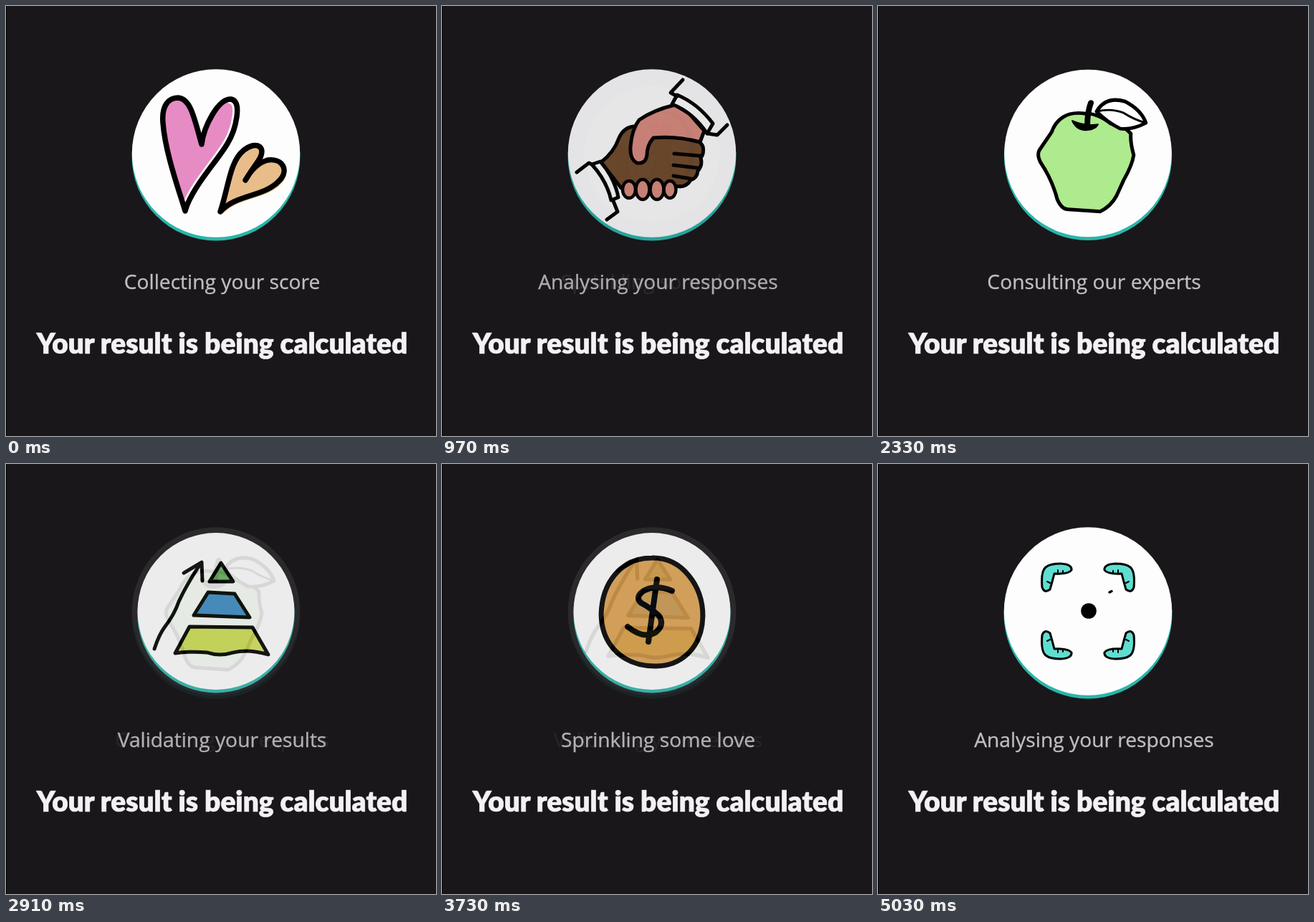
Write an HTML page that moves like this. It is 600 px wide and 600 px high and loops after 5.06 s.

```html
<!DOCTYPE html>
<html lang="en">
<head>
<meta charset="utf-8">
<title>Calculating</title>
<style>
html, body { margin: 0; height: 100%; overflow: hidden; background: #19171a; }
svg { display: block; width: 600px; height: 600px; }
text { text-anchor: middle; }
.status { font: 28.2px "Open Sans", sans-serif; fill: #bfbec0; stroke: #bfbec0; stroke-width: .35px; }
.title { font: 900 38.8px Lato, sans-serif; fill: #f4f1f6; stroke: #f4f1f6; stroke-width: .7px; }
.ink { stroke: #000; fill: none; stroke-linecap: round; stroke-linejoin: round; }
</style>
</head>
<body>
<svg viewBox="0 0 600 600">
  <defs>
    <path id="bigHeart" d="M250 286C243 262 222 205 219 163C217 140 226 128 240 128C258 129 263 158 273 193C276 168 296 129 314 130C330 133 321 172 309 192C295 216 258 255 250 286Z"/>
    <path id="smallHeart" d="M299 287C311 251 312 217 332 201C350 187 365 197 352 216Q342 230 334 243Q347 220 365 215C386 212 395 229 382 243C361 267 321 262 299 287Z"/>
    <g id="pawn" fill="#dc9c52" stroke-width="1.8">
      <path d="M-10-63C-10-45-14-38-18-30H18C14-38 10-45 10-63Z"/>
      <circle cy="-83" r="16"/>
      <path d="M-12-74Q-14-68-19-63Q0-57 19-63Q14-68 12-74Q0-69-12-74Z" stroke="none"/>
      <path d="M-12-74Q-14-68-19-63Q0-57 19-63Q14-68 12-74"/>
      <path d="M-18-31Q-21-22-28-17Q-33-3-22-1Q0 2 22-1Q33-3 28-17Q21-22 18-31Q0-27-18-31Z"/>
      <path d="M-28-16Q-8-9 10-11M20-13L28-16" fill="none"/>
    </g>
    <g id="corner">
      <path d="M229 172Q227 150 234 144Q240 139 255 139Q271 140 270 148Q266 154 246 153Q243 165 240 175Q232 181 229 172Z" fill="#5fded0" stroke-width="3"/>
      <path d="M251 152V148M258 152V149M240 166L236 164" stroke-width="2"/>
    </g>
  </defs>

  <rect width="600" height="600" fill="#19171a"/>
  <rect width="1" height="600"/>

  <g class="scene" data-text="Collecting your score">
    <g class="ink" stroke-width="7.5">
      <use href="#bigHeart" fill="#e78bc5" stroke="none"/>
      <path d="M314 130C330 133 321 172 309 192C295 216 258 255 250 286" stroke="#fff" stroke-width="13"/>
      <use href="#bigHeart"/>
      <use href="#smallHeart" fill="#e8bd8a" stroke="none" transform="translate(3 4)"/>
      <use href="#smallHeart" fill="#e8bd8a"/>
    </g>
  </g>

  <g class="scene" data-text="Analysing your responses">
    <g class="ink" stroke-width="5">
      <path d="M222 218Q240 204 247 184Q254 168 270 168L330 181Q358 183 364 196Q366 206 361 212Q364 222 357 230Q356 240 347 243Q339 256 322 250L250 254Z" fill="#704a2c"/>
      <g fill="#da8a7f" stroke-width="4.5">
        <ellipse cx="261" cy="256" rx="9" ry="12"/>
        <ellipse cx="280" cy="256" rx="9.5" ry="14"/>
        <ellipse cx="300" cy="256" rx="9.5" ry="14"/>
        <ellipse cx="318" cy="256" rx="8.5" ry="12"/>
      </g>
      <path d="M325 138Q295 145 275 159Q265 172 263 196Q262 214 272 219Q284 221 286 208Q286 194 295 184Q328 181 360 190L366 174L345 150Z" fill="#da8a7f"/>
      <path d="M324 206L360 209M323 222L357 226M323 237L347 241"/>
      <path d="M328 124Q357 136 378 164L370 178Q350 148 321 137Z" fill="#fff"/>
      <path d="M336 103L319 121L328 126M371 178L384 180L398 166"/>
      <path d="M209 221L221 217Q241 240 246 267L236 271Q230 244 209 221Z" fill="#fff"/>
      <path d="M188 232L205 219L211 222M239 272L245 287L230 298"/>
    </g>
  </g>

  <g class="scene" data-text="Sprinkling some love">
    <g class="ink" stroke-width="1.8">
      <ellipse cx="317" cy="202" rx="50" ry="69" fill="#000"/>
      <ellipse cx="308.5" cy="202" rx="50" ry="68" fill="#fff"/>
      <use href="#pawn" x="310.5" y="269"/>
      <use href="#pawn" transform="translate(241 269) scale(.76)"/>
      <path d="M294 172L291 154L300 162L301 151L309 161L315 149L317 161L326 153L324 170Q309 166 294 172Z" fill="#d9e244"/>
      <path d="M335 232L350 218M341 234L351 224" stroke="#777" stroke-width="1.3"/>
    </g>
  </g>

  <g class="scene" data-text="Consulting our experts">
    <g class="ink" stroke-width="5">
      <path d="M290 150Q270 147 258 155Q247 162 242 176L225 201Q221 208 227 219Q243 243 250 270Q256 284 265 284L310 287Q325 280 333 265L343 243Q355 222 357 208Q352 190 353 178Q345 168 325 164Q305 149 290 150Z" fill="#aeea8e"/>
      <path d="M305 147Q318 125 345 133Q368 145 374 163Q355 173 338 171Q320 162 305 147Z" fill="#fff"/>
      <path d="M305 147Q325 142 343 149Q357 158 374 163" stroke-width="3"/>
      <path d="M271 160Q277 174 292 173Q304 172 307 165Q290 168 271 160Z" fill="#000" stroke-width="2"/>
      <path d="M292 168Q292 148 297 135" stroke-width="8"/>
    </g>
  </g>

  <g class="scene" data-text="Validating your results">
    <g class="ink" stroke-width="5" transform="translate(293 205.5) scale(1.07) translate(-293 -205.5)">
      <path d="M207 258Q213 239 221 228Q235 210 241 192Q252 168 272 138M248 152L273 137L274 163"/>
      <path d="M300 138L284 164H317Z" fill="#6fb063"/>
      <path d="M282 179L319 181L340 214L262 211Z" fill="#3f8ccb"/>
      <path d="M256 227L344 228L366 266Q338 258 318 263Q298 269 280 263Q258 261 236 264Z" fill="#d3df5c"/>
    </g>
  </g>

  <g class="scene" data-text="Sprinkling some love">
    <g class="ink" stroke-width="7" transform="translate(293 205.5) scale(1.07) translate(-293 -205.5)">
      <path d="M293 131C335 130 364 170 364 212C363 260 330 283 297 282C255 282 223 255 222 210C223 165 250 131 293 131Z" fill="#dda251"/>
      <path d="M321 177Q300 168 283 176Q268 185 278 194Q290 200 303 212Q311 225 298 235Q281 245 259 227M300 161L288 248" stroke-width="8"/>
    </g>
  </g>

  <g class="scene" data-text="Analysing your responses">
    <g class="ink">
      <use href="#corner"/>
      <use href="#corner" transform="matrix(-1 0 0 1 586 0)"/>
      <use href="#corner" transform="matrix(1 0 0 -1 0 411)"/>
      <use href="#corner" transform="matrix(-1 0 0 -1 586 411)"/>
      <circle cx="294" cy="205" r="10.8" fill="#000" stroke="none"/>
      <path d="M323 179L326 177.5" stroke-width="3.5"/>
    </g>
  </g>

  <text class="title" x="301.5" y="484.5">Your result is being calculated</text>
</svg>
<script>
const LOOP = 5060, FIRST = 110, STEP = 820, FADE = 370, GROW = 620;
const CX = 293, CY = 205.5;
const svg = document.querySelector("svg");
const clamp = v => Math.max(0, Math.min(1, v));

function add(parent, tag, attrs, before = null) {
  const el = document.createElementNS(svg.namespaceURI, tag);
  for (const name in attrs) el.setAttribute(name, attrs[name]);
  return parent.insertBefore(el, before);
}

const scenes = [...document.querySelectorAll(".scene")].map(badge => {
  const icon = badge.firstElementChild;
  add(badge, "circle", { cx: CX, cy: CY + 4.5, r: 117.5, fill: "#2ab5aa" }, icon);
  add(badge, "circle", { cx: CX, cy: CY, r: 117.2, fill: "#fefdfe" }, icon);
  const label = add(svg, "text", { class: "status", x: 301.5, y: 395 });
  label.textContent = badge.dataset.text;
  return { badge, label };
});
// Outgoing badges lie above the incoming ones.
scenes.forEach(({ badge }) => svg.prepend(badge));
svg.prepend(...svg.querySelectorAll(":scope > rect"));

function draw(now) {
  const t = now % LOOP;
  scenes.forEach(({ badge, label }, i) => {
    const start = FIRST + (i - 1) * STEP;
    const last = i === scenes.length - 1;
    const fadeIn = i ? clamp((t - start) / FADE) : 1;
    const fadeOut = last ? 0 : clamp((t - start - STEP) / FADE);
    const left = i ? 1 - clamp((t - start) / GROW) : 0;
    const scale = 1 - 0.22 * left ** 1.5;
    const alpha = fadeIn * (1 - fadeOut);
    badge.setAttribute("opacity", alpha);
    label.setAttribute("opacity", alpha);
    badge.setAttribute("transform",
      `translate(${CX} ${CY}) scale(${scale}) translate(${-CX} ${-CY})`);
  });
}

const begin = performance.now();
function tick() {
  draw(performance.now() - begin);
  requestAnimationFrame(tick);
}
tick();
</script>
</body>
</html>
```
